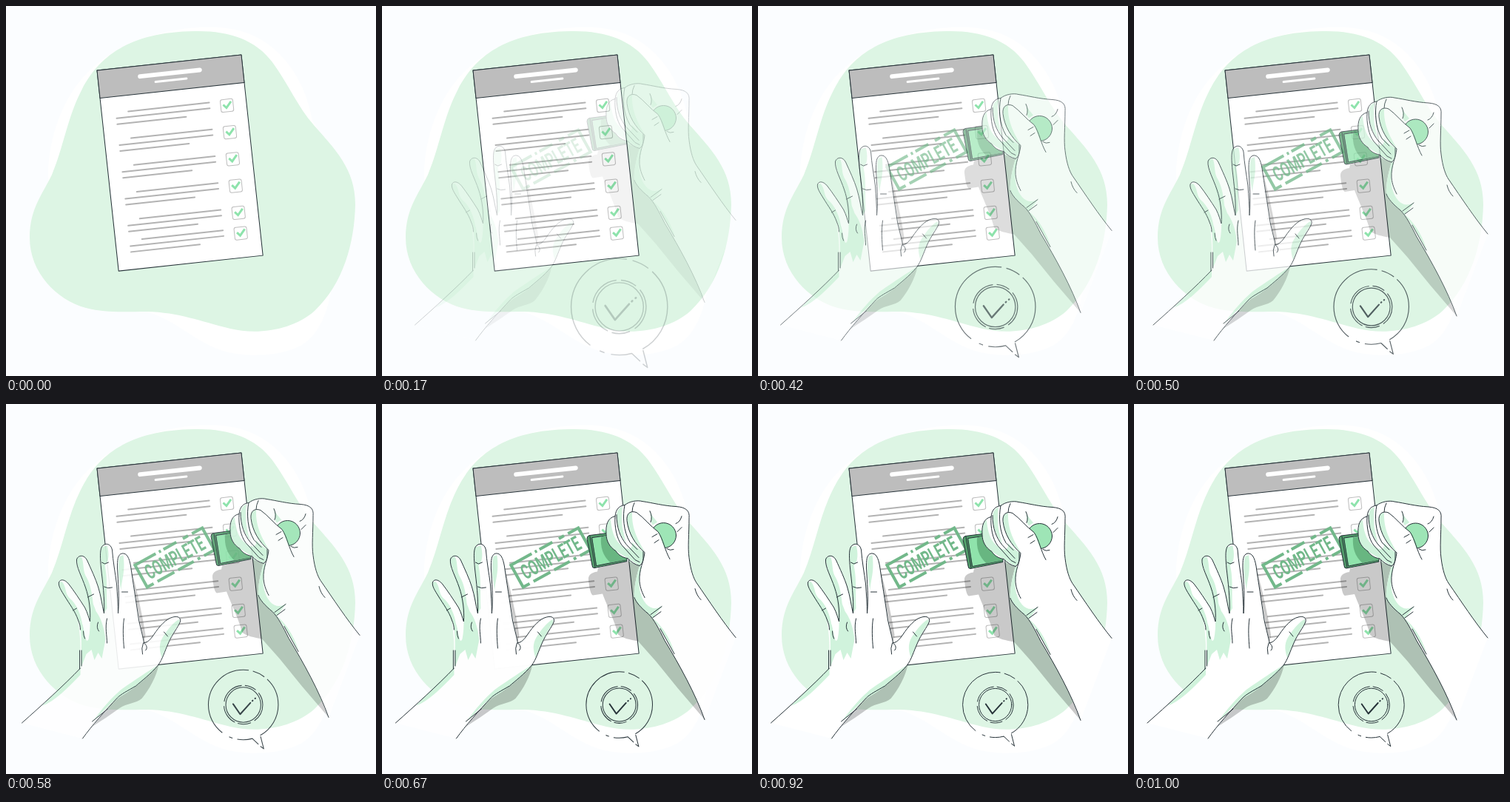
An HTML page for the animation above (1.04 s loop, 500 px wide and 500 px high).

```html
<!DOCTYPE html>
<html lang="en">
<head>
<meta charset="utf-8">
<title>Checklist approval</title>
<style>
html, body { margin: 0; width: 100%; height: 100%; overflow: hidden; background: #fbfdff; }
svg { display: block; width: 100vw; height: 100vh; }
.ink { fill: none; stroke: #263238; stroke-width: 1; stroke-linecap: round; stroke-linejoin: round; }
.skin { fill: #fff; }
.tint { fill: #d0f3dc; }
.shade { fill: #000; fill-opacity: .21; }
.row { fill: none; stroke: #b3b3b3; stroke-width: 2; stroke-linecap: round; }
.print { font: 700 28px Roboto, Arial, sans-serif; text-anchor: middle; }
</style>
</head>
<body>
<svg viewBox="0 0 500 500">
  <path fill="#fff" d="M57 225C58 180 75 125 110 90C160 40 250 20 310 32C370 45 405 100 414 155C445 200 442 260 442 330C445 390 430 440 400 458C370 475 320 475 290 465C250 450 230 425 190 413C120 390 57 300 57 225Z"/>
  <path fill="#ddf5e4" d="M255 34C300 33 337 45 360 76C382 106 394 136 416 161C444 193 472 220 472 268C471 320 456 375 417 412C388 438 340 445 303 436C262 426 234 414 190 413C158 413 135 415 108 408C68 397 32 360 32 313C32 274 49 255 62 228C78 190 83 150 103 112C125 70 165 35 255 34Z"/>

  <g transform="translate(123 87) rotate(-6.15)">
    <path class="ink" style="fill:#fff" d="M0 0H196.1V272.7H0Z"/>
    <path class="ink" style="fill:#bdbdbd" d="M0 0H196.1V37.7H0Z"/>
    <g stroke="#fff" stroke-linecap="round">
      <path stroke-width="6" d="M57 14.3H138"/>
      <path stroke-width="3" d="M77 23.9H119"/>
    </g>
    <g id="rows"></g>
  </g>

  <g id="print" transform="translate(228 207.5) rotate(-29)" fill="#72b88a" stroke="#72b88a">
    <path fill="none" stroke-width="4" d="M-20 -17H-52V17H-42M-36 17H-10M-4 17H20M26 17H30M36 17H52V-17H36M30 -17H22M12 -17H-8M-12 -17H-15"/>
    <text class="print" stroke="none" y="10" transform="scale(.61 1)">COMPLETE</text>
  </g>

  <g id="left">
    <path class="shade" d="M113 436C128 416 138 406 150 396C168 386 190 366 203 352C200 368 190 386 180 398C172 405 160 404 150 411C138 420 125 428 113 436ZM166 224C173 250 181 285 185 312L183 323C178 295 170 255 166 224Z"/>
    <path class="skin" d="M18 431C45 407 75 380 97 357V330C97 320 96 308 94 292C90 280 82 270 76 260C71 252 67 246 68 241C70 236 76 237 81 243C88 252 96 264 103 275C107 283 108 288 110 294C111 280 109 262 104 248C99 233 91 220 92 210C94 204 102 203 106 211C111 222 118 237 121 247C125 260 126 270 129 283C130 262 127 240 125 222C124 210 123 198 126 193C130 187 138 188 140 197C141 212 144 228 146 243C147 258 148 270 148 283C150 262 148 240 147 222C147 211 147 204 153 202C160 201 163 208 165 219C168 240 172 265 176 292C179 306 182 316 183 323C188 322 192 318 196 312C204 300 213 290 222 288C229 286 233 289 232 294C229 302 221 311 216 323C211 334 208 345 202 353C192 365 180 374 172 381C160 388 152 392 147 397C130 415 113 434 100 452Z"/>
    <g class="tint">
      <path d="M68 241C66 246 75 260 94 292L100 300C98 285 92 270 82 262C76 256 78 246 72 240Z"/>
      <path d="M92 208C91 220 105 240 110 294L116 290C114 262 112 245 104 232C100 224 102 212 98 206Z"/>
      <path d="M125 194C123 210 128 240 129 283L133 276C132 250 134 238 130 218C136 214 136 200 133 191Z"/>
      <path d="M150 206C146 222 150 240 152 252C153 235 158 228 155 204Z"/>
      <path d="M95 293C100 310 98 335 98 356L105 338 112 332 116 346 121 336 126 344 131 318C129 300 124 288 118 280C114 268 110 262 106 258C110 275 112 300 108 318C104 325 104 312 100 298Z"/>
      <path d="M45 408C62 402 80 384 97 366V357C80 373 62 391 45 408Z"/>
      <path d="M231 291C226 292 216 303 211 311C203 322 203 330 207 343C213 330 219 312 231 296Z"/>
      <path d="M202 353C190 360 172 372 152 386C138 398 125 413 113 430C125 418 138 405 147 397C162 390 185 374 202 353Z"/>
    </g>
    <path class="ink" d="M18 431C45 407 75 380 97 357M96 358V333M98.500 354V333M97 305C97 300 96 297 94 292C90 280 82 270 76 260C71 252 67 246 68 241C70 236 76 237 81 243C88 252 96 264 103 275C107 283 108 288 110 294C111 280 109 262 104 248C99 233 91 220 92 210C94 204 102 203 106 211C111 222 118 237 121 247C125 260 126 270 129 283C130 262 127 240 125 222C124 210 123 198 126 193C130 187 138 188 140 197C141 212 144 228 146 243C147 258 148 270 148 283C150 262 148 240 147 222C147 211 147 204 153 202C160 201 163 208 165 219C168 240 172 265 176 292C179 306 182 316 183 323C188 322 192 318 196 312C204 300 213 290 222 288C229 286 233 289 232 294C229 302 221 311 216 323C211 334 208 345 202 353C192 365 180 374 172 381C160 388 152 392 147 397C130 415 113 434 100 452"/>
    <path class="ink" d="M183 323C187 326 188 330 185 333M182 323Q179 330 181 338M113 429L134 412M126 214L130 216 135 214M129 247Q134 250 140 248M153 254H161M107 261L115 257M87 279L92 276M101 307Q101 313 103 317M121 295Q118 302 122 307M133 290C130 303 133 312 133 323M156 290C154 303 155 318 156 330M210 308L215 314"/>
  </g>

  <g id="right">
    <path class="shade" d="M279 238Q278 229 291 227L292 222 330 212 348 219 370 270 436 427 400 385 370 348 346 321C335 319 325 317 319 312C315 295 306 278 298 257L285 259Q281 258 279 238Z"/>
    <path class="ink" style="fill:#529d6b" d="M277 182Q277 179 280 178L304 175 331 209V213L287 222Q284 222 284 219Z"/>
    <path class="ink" style="fill:#8fe3ab" d="M284 181L304 178 331 209 330 211 290 219Z"/>
    <path fill="#68b681" d="M296 180L304 178 331 209 330 211 309 215C298 206 295 193 296 180Z"/>
    <path class="ink" d="M281 179L288 221"/>
    <path class="skin" d="M436 427C424 393 402 353 382 320C374 304 368 292 360 284C350 276 343 268 341 262C340 250 344 232 348 219C341 217 337 214 332 209C325 208 319 204 316 199C308 194 303 186 303 176C302 164 305 154 315 152C316 143 320 138 328 137C334 132 345 130 352 132C366 134 380 138 398 139C411 140 416 145 415 154C415 175 413 195 415 208C417 225 421 236 425 242C443 268 460 294 478 316Z"/>
    <g class="tint">
      <path d="M341 262C343 268 350 276 360 284C372 296 385 318 396 338C388 315 379 301 366 290L379 273C366 282 354 273 349 255C346 242 348 232 351 220L348 219C344 232 340 250 341 262Z"/>
      <path d="M303 173C303 185 308 194 316 199L332 209 348 219 353 212 354 201C348 196 342 193 338 187C339 195 335 198 329 195C319 189 311 182 309 156Q303 160 303 173Z"/>
      <path d="M317 150C317 164 321 177 330 188C326 174 322 160 325 139Q318 141 317 150ZM360 144C366 152 361 158 366 164L372 160Q365 152 360 144Z"/>
    </g>
    <circle class="ink" style="fill:#9ee5b6" cx="380.500" cy="178" r="17"/>
    <path class="skin" d="M331 158C330 148 336 144 344 147C354 154 362 165 373 173C378 183 382 198 389 210L372 230 351 232 355 201C342 190 333 175 331 158Z"/>
    <path class="tint" d="M331 154C331 172 340 188 355 200C347 186 337 170 338 147Q332 147 331 154Z"/>
    <path class="ink" d="M389 210C382 198 380 183 373 173C362 165 354 154 344 147C336 144 330 148 331 158C333 175 342 190 355 201C354 213 347 224 348 240C349 250 352 256 355 262"/>
    <path class="ink" d="M436 427C424 393 402 353 382 320C374 304 368 292 360 284C350 276 343 268 341 262M348 219C341 217 337 214 332 209C325 208 319 204 316 199C308 194 303 186 303 176C302 164 305 154 315 152C316 143 320 138 328 137C334 132 345 130 352 132C366 134 380 138 398 139C411 140 416 145 415 154C415 175 413 195 415 208C417 225 421 236 425 242C443 268 460 294 478 316"/>
    <path class="ink" d="M348 219Q353 216 353 209V200M315 152C314 166 317 182 324 191L342 211 348 214M317 150C317 168 322 180 330 190L347 208M328 137C325 152 326 172 335 187L345 197M341 134Q338 140 338 146M362 145Q366 153 363 160M397 162Q403 160 405 152M399 173L405 167M385 196Q389 199 394 197M365 180L372 176M368 188L374 184M363 285L378 274M366 289L377 281M376 304L395 338M423 250Q425 259 431 265"/>
  </g>

  <g id="bubble" class="ink">
    <circle r="44.500" pathLength="360" stroke-dasharray="61 14 25 8 6 13 152 7 21 6 47 0" style="stroke-linecap:butt"/>
    <circle r="24.700" pathLength="360" stroke-dasharray="55 12 40 9 60 14 75 10 35 12 38 0" style="stroke-linecap:butt"/>
    <circle r="22.300"/>
    <path d="M22 40.500L26 56M11.500 43L19 50M22 53L26 56"/>
    <path stroke-width="1.900" d="M-13 -1L-4 12 9 -2.500M11.500 -5L12 -5.500M15 -8L15.300 -8.300"/>
  </g>
</svg>
<script>
const LOOP = 1040, STEP = 1000 / 24;
// Distance left to travel, by step: fast approach, slight overshoot, settle.
const KEYS = [[1, 34], [4, 26.5], [8, 17.5], [10, 12.5], [14, 3.5], [16, .4], [18, -1], [20, -1], [24, 0]];
const $ = id => document.getElementById(id);

$('rows').innerHTML = [0, 36.4, 72.8, 109.3, 145.8, 173.6].map(y => `
  <g transform="translate(0 ${y})">
    <path class="row" d="M36 59.600H146M19.500 67.300H146M19.500 75.300H113"/>
    <rect x="161" y="57.500" width="17" height="17" rx="2.500" fill="#fff" stroke="#bdbdbd"/>
    <path d="M164.500 64.500l4 4.500 7 -8" fill="none" stroke="#8ee3ac" stroke-width="3"/>
  </g>`).join('');

function remaining(step) {
  if (step <= 1) return KEYS[0][1];
  const i = KEYS.findIndex(key => key[0] >= step);
  const [a, from] = KEYS[i - 1], [b, to] = KEYS[i];
  return from + (to - from) * (step - a) / (b - a);
}

function draw(now) {
  const step = Math.min(24, Math.floor((now % LOOP + 5) / STEP));
  const gap = remaining(step);
  for (const id of ['print', 'left', 'right', 'bubble'])
    $(id).setAttribute('opacity', Math.min(1, 1 - gap / 34));
  $('left').setAttribute('transform', `translate(${gap} 0)`);
  $('right').setAttribute('transform', `translate(0 ${-gap})`);
  $('bubble').setAttribute('transform', `translate(320.7 406.5) scale(${1 + gap * .0175})`);
}

const start = performance.now();
function tick() {
  draw(performance.now() - start);
  requestAnimationFrame(tick);
}
tick();
</script>
</body>
</html>
```
